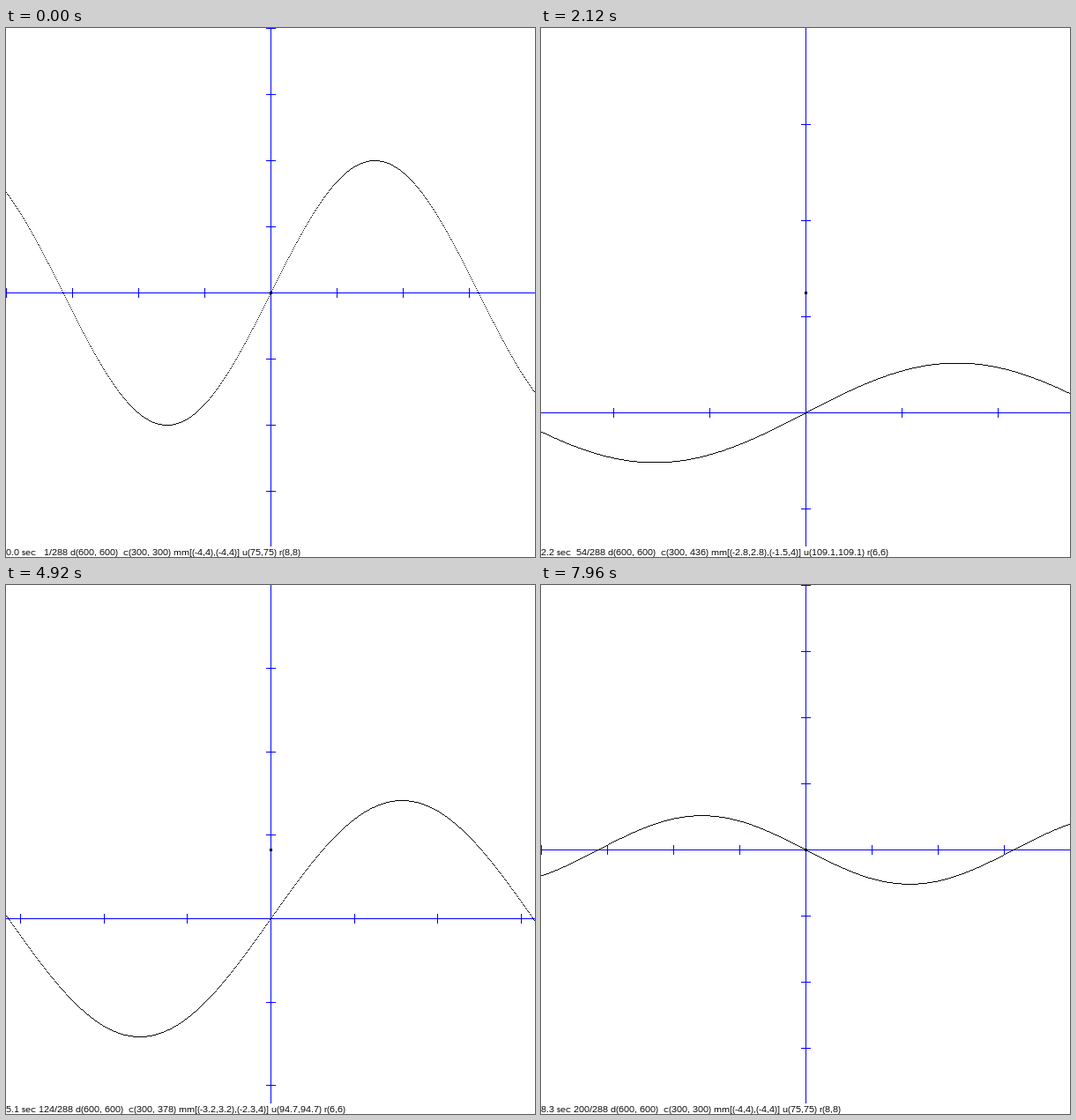
Animation, 600 px wide and 600 px high, one loop 8000 ms. Source, as a matplotlib script:

```python
import numpy as np
import matplotlib.pyplot as plt
from matplotlib.animation import FuncAnimation

plt.rcParams["text.hinting"] = "native"
plt.rcParams["text.hinting_factor"] = 1
plt.rcParams["font.family"] = "Liberation Sans"

SIZE, MID = 600, 300
FRAMES, TOTAL, FPS = 200, 288, 24
BLUE, BLACK, WHITE = (0, 0, 255), (0, 0, 0), (255, 255, 255)
TOP = 4
TICK = 5
BAR_TOP = 588

fig = plt.figure(figsize=(10, 10), dpi=60, facecolor="white")
ax = fig.add_axes([0, 0, 1, 1])
ax.axis("off")
canvas = np.full((SIZE, SIZE, 3), 255, np.uint8)
picture = ax.imshow(canvas, interpolation="nearest", aspect="auto")
label = fig.text(0, 2 / SIZE, "", fontsize=12, color="black", va="baseline")


def num(v):
    return f"{round(v, 1) + 0.0:g}"


def bottom_at(n):
    """Lower bound of the view: up for 2 s, hold for 1 s, down for 2 s."""
    return -4 + np.interp(n, [24, 72, 96, 144], [0, 4, 4, 0])


def ticks(origin, unit):
    for n in range(-8, 9):
        p = origin + n * unit
        if n and 0 <= p < SIZE:
            yield n, min(int(round(p)), SIZE - 1)


def draw_axes(cy, unit, dim):
    canvas[:, MID] = BLUE
    for _, y in ticks(cy, unit):
        canvas[y, MID - TICK:MID + TICK + 1] = BLUE
    if cy >= SIZE:
        return
    for n, x in ticks(MID, unit):
        tone = BLACK if dim and abs(n) > 1 else BLUE
        canvas[max(cy - TICK, 0):cy + TICK + 1, x] = tone
    canvas[cy] = BLACK if dim else BLUE
    canvas[cy, MID] = BLUE


def draw_curve(cy, unit, amp):
    px = np.arange(SIZE)
    py = np.rint(cy - unit * amp * np.sin((px - MID) / unit)).astype(int)
    seen = (py >= 0) & (py < SIZE)
    canvas[py[seen], px[seen]] = BLACK


def caption(i, low, span, unit, cy):
    half, u, r = num(span / 2), num(unit), f"{span:.0f}"
    return (f"{i / FPS:.1f} sec {i + 1:3d}/{TOTAL} d({SIZE}, {SIZE})  "
            f"c({MID}, {cy}) mm[(-{half},{half}),({num(low)},{TOP})] "
            f"u({u},{u}) r({r},{r})")


def update(i):
    low = bottom_at(i + 1)
    span = TOP - low
    unit = SIZE / span
    cy = int(TOP * unit + 1e-9)
    amp = 2 * np.cos(2 * np.pi * i / FPS)

    canvas[:] = WHITE
    draw_axes(cy, unit, 7 < span < 8)
    draw_curve(cy, unit, amp)
    canvas[MID - 1:MID + 2, MID - 1:MID + 2] = BLACK

    label.set_text(caption(i, low, span, unit, cy))
    width = int(np.ceil(label.get_window_extent().x1))
    canvas[BAR_TOP:, :width] = WHITE
    picture.set_data(canvas)
    return picture, label


anim = FuncAnimation(fig, update, frames=FRAMES, interval=40,
                     repeat=True, repeat_delay=0, blit=False)
plt.show()
```
